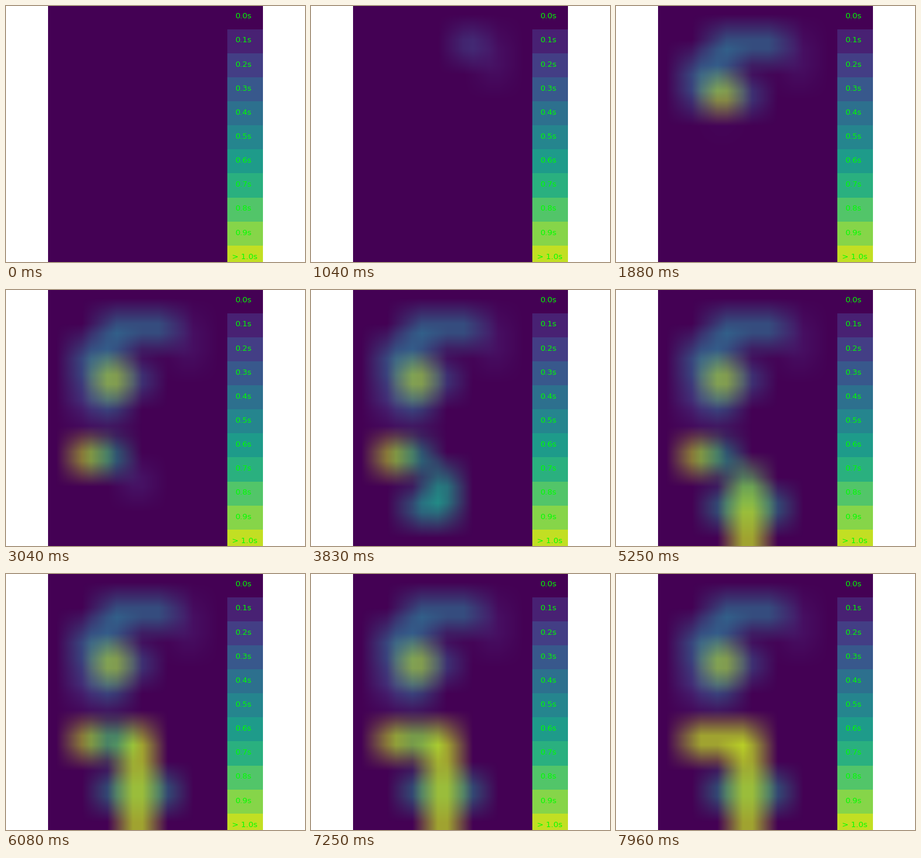
Animation of 512 by 438 pixels, one loop 8000 ms. Source, as a matplotlib script:

```python
import matplotlib.pyplot as plt
import numpy as np
from matplotlib.animation import FuncAnimation
from matplotlib.patches import Rectangle

W, H, DPI = 512, 438, 64
FRAMES, STEP = 200, 40
LEFT, RIGHT, BAR_END = 72, 379, 440
COLS, ROWS = 7, 10
KERNEL = 60          # width of the box blur in pixels
LEVELS = 11          # one level per 0.1 s
BAND = 41.15
START = 880

cmap = plt.get_cmap("viridis")

# Passes run one after another: duration in ms, first cell, last cell, levels added
PASSES = [
    (100, (5, 2), (5, 1), 0.6),
    (300, (4, 1), (2, 1), 3.7),
    (160, (2, 2), (1, 2), 3.4),
    (200, (1, 3), (3, 3), 3),
    (220, (2, 3), (2, 3), 7),
    (300, (2, 4), (1, 4), 1.6),
    (140, (2, 4), (2, 4), 2),
    (200, (1, 6), (1, 6), 4),
    (500, (1, 6), (2, 6), 6),
    (500, (3, 7), (3, 8), 6),
    (900, (2, 8), (4, 8), 5),
    (1500, (3, 9), (3, 6), 10),
    (2000, (2, 6), (2, 6), 4),
]


def heat_grid(ms):
    """Each pass warms its cells in turn, up to the top level."""
    grid = np.zeros((ROWS, COLS))
    begin = START
    for duration, first, last, level in PASSES:
        count = max(abs(np.subtract(last, first))) + 1
        cells = np.linspace(first, last, count).astype(int)
        progress = (ms - begin) / duration * count
        for k, (col, row) in enumerate(cells):
            grid[row, col] += level * np.clip(progress - k, 0, 1)
        begin += duration
    return np.minimum(grid, LEVELS - 1)


def spread(size, cells):
    """Share of each cell in each pixel after a box blur along one axis."""
    px = np.arange(size) + 0.5
    edges = np.linspace(0, size, cells + 1)
    edges[0], edges[-1] = -np.inf, np.inf
    below = np.clip((edges[:, None] - px) / KERNEL + 0.5, 0, 1)
    return np.diff(below, axis=0)


SPREAD_X = spread(RIGHT - LEFT, COLS)
SPREAD_Y = spread(H, ROWS)


def heat_image(ms):
    colours = cmap(heat_grid(ms) / LEVELS)[..., :3]
    image = np.einsum("ry,rck,cx->yxk", SPREAD_Y, colours, SPREAD_X, optimize=True)
    return np.clip(image, 0, 1)


fig = plt.figure(figsize=(W / DPI, H / DPI), dpi=DPI, facecolor="white")
ax = fig.add_axes([0, 0, 1, 1])
field = ax.imshow(heat_image(0), extent=(LEFT, RIGHT, H, 0),
                  interpolation="nearest", aspect="auto")

for i in range(LEVELS):
    top = max(0, round(39.5 + BAND * (i - 1)))
    ax.add_patch(Rectangle((RIGHT, top), BAR_END - RIGHT, H - top, lw=0,
                           color=cmap(i / LEVELS), antialiased=False))
    last = i == LEVELS - 1
    ax.text(409 if last else 406.5, 21.2 + BAND * i,
            f"> {i / 10:.1f}s" if last else f"{i / 10:.1f}s",
            color="#00ff00", family="DejaVu Sans", size=15,
            ha="center", va="baseline")

ax.set_xlim(0, W)
ax.set_ylim(H, 0)
ax.axis("off")


def update(i):
    field.set_data(heat_image(i * STEP))
    return [field]


anim = FuncAnimation(fig, update, frames=FRAMES, interval=STEP,
                     repeat=True, repeat_delay=0)
plt.show()
```
